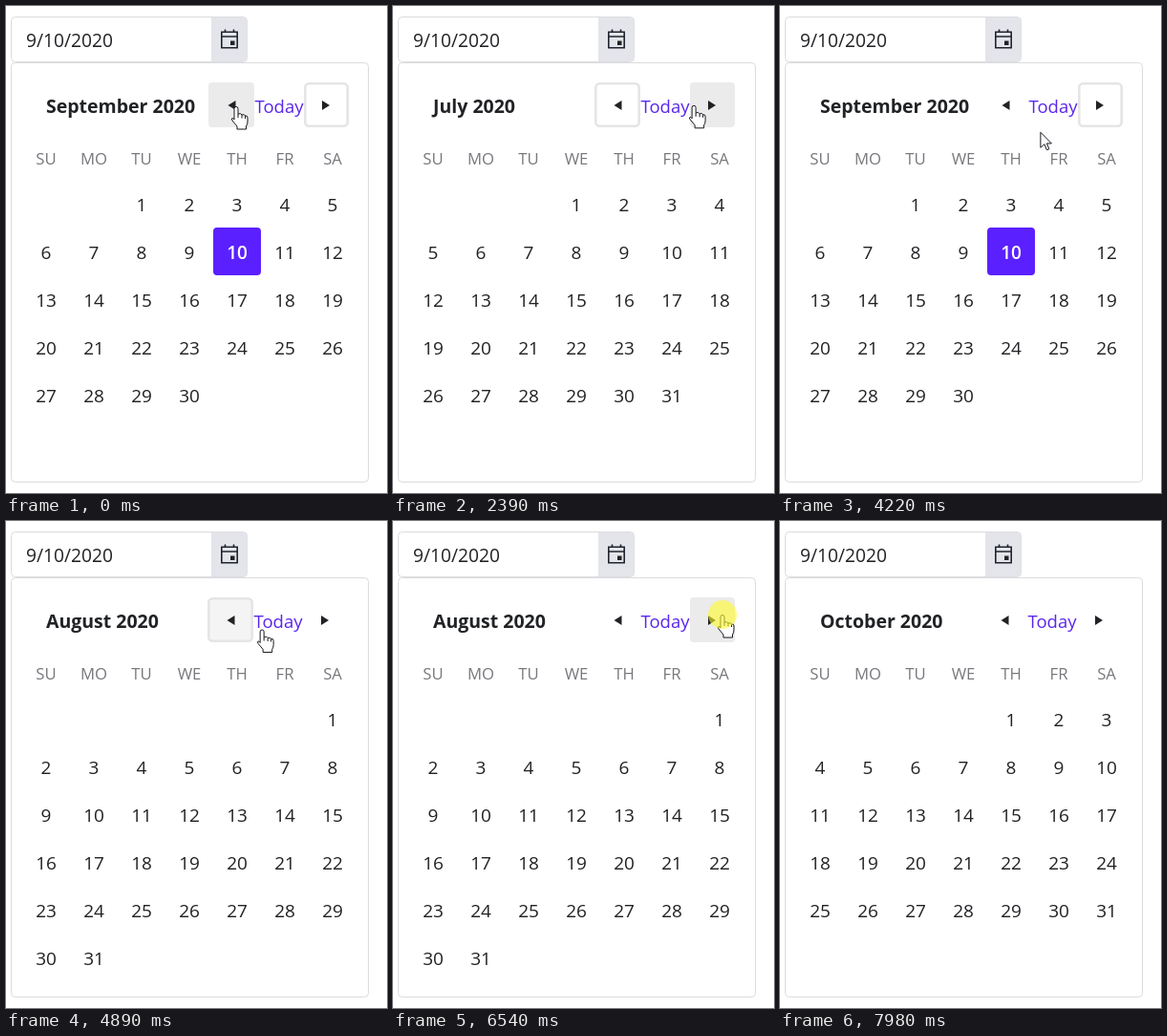
Write an HTML page that moves like this. It is 399 by 510 pixels and loops after 8110 ms.

```html
<!DOCTYPE html>
<html lang="en">
<head>
<meta charset="utf-8">
<style>
  html, body { margin: 0; width: 100%; height: 100%; overflow: hidden; background: #fff; }
  svg { display: block; font: 19.2px "Open Sans", sans-serif; fill: #212225; }
  .frame { fill: #fff; stroke: #dcdce0; }
  .title { font-size: 19.5px; font-weight: 700; }
  .link { font-size: 18.5px; fill: #5a26ee; }
  .week { font-size: 16.7px; fill: #77787d; text-anchor: middle; }
  .day { font-size: 19px; text-anchor: middle; }
  .chosen { fill: #fff; font-weight: 600; }
  .icon { fill: none; stroke: #20242e; stroke-width: 1.6; }
  .cursor { fill: #fff; stroke: #15161c; stroke-linejoin: round; }
</style>
</head>
<body>
<svg width="399" height="510" viewBox="0 0 399 510">
  <rect class="frame" x="5.5" y="11.5" width="247" height="47" rx="4"/>
  <path d="M215 12h33.5a4 4 0 0 1 4 4v38a4 4 0 0 1-4 4H215z" fill="#e4e5ea"/>
  <text x="21" y="43">9/10/2020</text>
  <path class="icon" d="M225.8 27.3h16.4v16.4h-16.4zM225.8 32h16.4M229.5 24.5v3M238.5 24.5v3"/>
  <path d="M235 36.500h4.500v4.500H235z"/>
  <rect class="frame" x="5.5" y="59.5" width="374" height="439" rx="4"/>
  <g id="view"></g>
</svg>
<script>
const LOOP = 8110, TICK = 107, BLUR_AT = 7980, PREV = -1, NEXT = 1;
const HAND = 'M-2 14V2.5Q-2 .5 0 .5T2 2.5V8Q5.500 7 6 9Q9 8 9.500 10Q12 9.500 12 12V16' +
  'Q12 19 10.500 21V24H1V21L-4 15Q-5.500 12.500-4 12.500Q-3 12.500-2 14ZM2 8v4M6 9v3.500M9.500 10v3';
const ARROW = 'M0 0V16L4 12.500 6.500 18.500 9 17.500 6.500 11.700H11.500Z';

const CLICKS = [[410, PREV], [1620, PREV], [2490, NEXT], [3240, NEXT], [4560, PREV], [6540, NEXT], [6980, NEXT]];

// first and last step of each pointer move, then its Bézier controls and end point
const HOME = [241, 105];
const MOVES = [
  [2050, 2490, [265, 118], [300, 112], [337, 95]],
  [3720, 4440, [475, 30], [256, 193], [220, 107]],
  [4890, 5320, [300, 120], [396, 125], [287, 73]],
  [5440, 6430, [3, 10], [439, 233], [345, 98]],
  [7300, 7760, [366, 160], [366, 400], [350, 530]]
];

const view = document.getElementById('view');
const label = (kind, x, y, text) => `<text class="${kind}" x="${x}" y="${y}">${text}</text>`;
const buttonLeft = side => side === PREV ? 211 : 311;
const isOver = (side, [x, y]) => x >= buttonLeft(side) && x < buttonLeft(side) + 48 && y >= 80 && y < 127;
const bezier = (a, b, c, d, u) =>
  (1 - u) ** 3 * a + 3 * u * (1 - u) ** 2 * b + 3 * u * u * (1 - u) * c + u ** 3 * d;

function pointerAt(t) {
  let from = HOME;
  for (const [first, last, c1, c2, to] of MOVES) {
    if (t < first) break;
    const gaps = Math.round((last - first) / TICK);
    const step = Math.floor((t - first) / (last - first) * gaps + .25) + 1;
    const u = Math.min(1, step / (gaps + 1));
    if (u < 1) return from.map((a, i) => bezier(a, c1[i], c2[i], to[i], u));
    from = to;
  }
  return from;
}

function stateAt(t) {
  const state = { month: 8, focus: NEXT, pressed: false };
  for (const [press, side] of CLICKS) {
    const age = t - press;
    if (age < 0) break;
    if (state.focus !== side) state.focus = 0;
    if (age >= TICK) state.month += side;
    state.pressed = age < 2 * TICK;
    if (!state.pressed) state.focus = side;
  }
  if (t >= BLUR_AT) state.focus = 0;
  return state;
}

function drawButton(side, t, focused, shift) {
  const left = buttonLeft(side) + shift, width = side === PREV ? 48 : 47;
  const over = isOver(side, pointerAt(t)), fading = isOver(side, pointerAt(t - TICK + 2));
  const fill = over ? '#ebebeb' : fading ? '#f4f4f4' : '#fff';
  const border = focused ? (over ? '#d2d2d2' : '#e5e5e6') : 'none';
  const inset = focused ? 1.3 : 0, middle = left + (side === PREV ? 24.5 : 23);
  return `<rect x="${left + inset}" y="${80 + inset}" width="${width - 2 * inset}" height="${47 - 2 * inset}"
    rx="4" fill="${fill}" stroke="${border}" stroke-width="2.6"/>
    <path d="M${middle + 4 * side} 104l${-8 * side}-5v10z"/>`;
}

function drawMonth(month, shift) {
  const start = new Date(2020, month, 1), first = start.getDay();
  const count = new Date(2020, month + 1, 0).getDate();
  const title = start.toLocaleString('en', { month: 'long' }) + ' 2020';
  let out = label('title', 42, 112, title) + label('link', 259.5 + shift, 112, 'Today');
  'SU MO TU WE TH FR SA'.split(' ').forEach((name, i) => out += label('week', 42 + 50 * i, 166, name));
  for (let day = 1; day <= count; day++) {
    const cell = first + day - 1, x = 42 + 50 * (cell % 7), y = 215 + 50 * Math.floor(cell / 7);
    const chosen = month === 8 && day === 10;
    if (chosen) out += `<rect x="${x - 25}" y="${y - 33}" width="50" height="50" rx="4" fill="#5b20ff"/>`;
    out += label(chosen ? 'day chosen' : 'day', x, y, day);
  }
  return out;
}

function drawPointer(t, pressed) {
  const point = pointerAt(t), [x, y] = point;
  const onLink = x >= 259 && x < 312 && y > 92 && y < 118;
  const hand = onLink || isOver(PREV, point) || isOver(NEXT, point);
  return `<path class="cursor" transform="translate(${x} ${y})" d="${hand ? HAND : ARROW}"/>` +
    (pressed ? `<circle cx="${x}" cy="${y}" r="15" fill="#fffa28" opacity=".6"/>` : '');
}

let shown = '';
function render(t) {
  const { month, focus, pressed } = stateAt(t), shift = month === 8 ? 1 : 0;
  const picture = [PREV, NEXT].map(side => drawButton(side, t, focus === side, shift)).join('') +
    drawMonth(month, shift) + drawPointer(t, pressed);
  if (picture !== shown) view.innerHTML = shown = picture;
}

const begin = performance.now();
function tick() {
  render((performance.now() - begin) % LOOP);
  requestAnimationFrame(tick);
}
tick();
</script>
</body>
</html>
```
